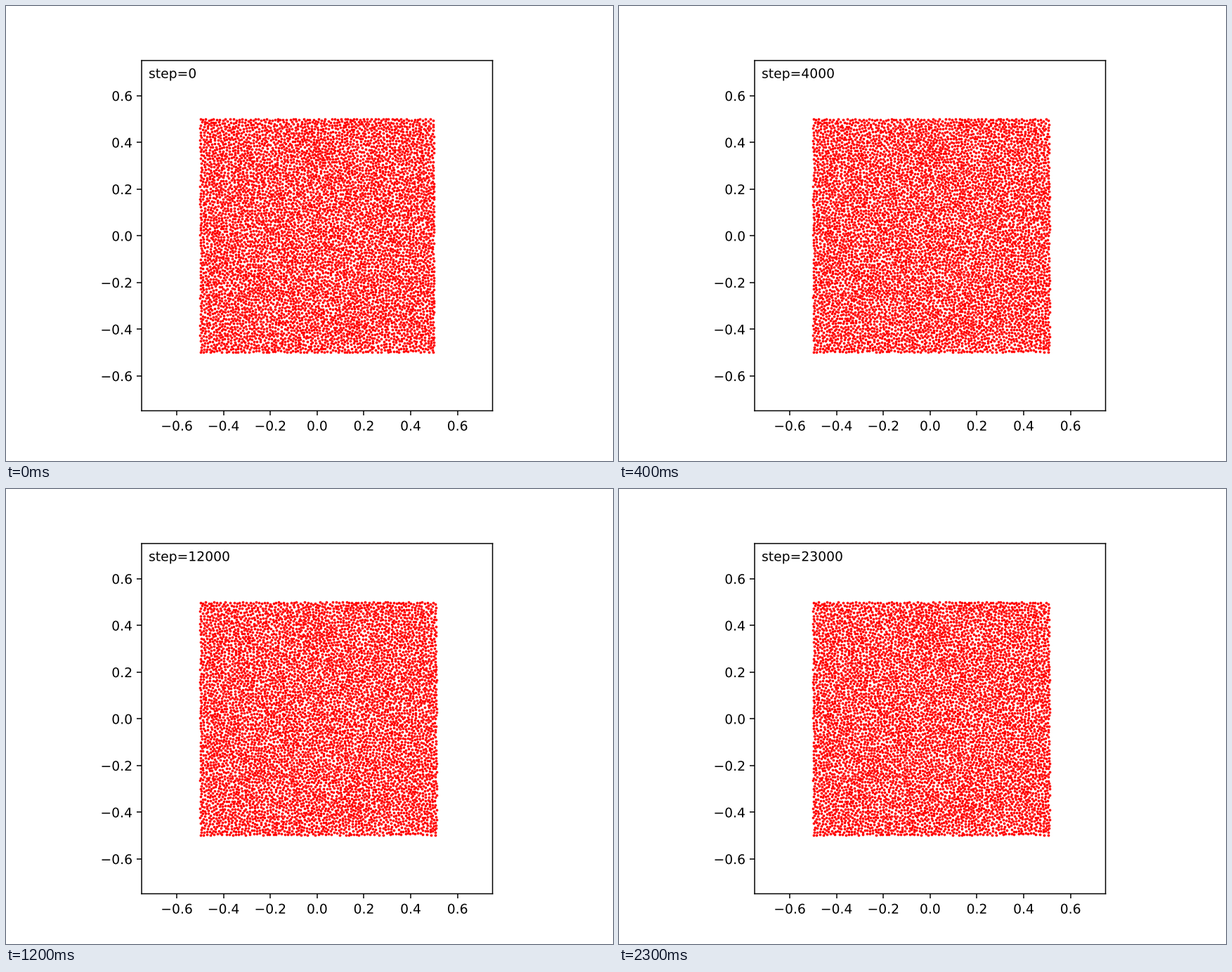
These frames come from a looping animation (864x648 px, 2400 ms). A matplotlib script:

```python
import numpy as np
import matplotlib.pyplot as plt
from matplotlib.animation import FuncAnimation
from matplotlib.patheffects import Normal

FRAMES = 24
INTERVAL = 100
STEPS_PER_FRAME = 1000
SPACING = 0.01
TRIES = 250_000
STRETCH = 0.01
POISSON = 1 / 3


def spread_points(spacing, tries, seed=0):
    """Random points in the unit square, none closer than the spacing."""
    cells = {}
    rng = np.random.RandomState(seed)
    near = [(i, j) for i in (-1, 0, 1) for j in (-1, 0, 1)]
    limit = spacing ** 2
    for x, y in rng.rand(tries, 2).tolist():
        cx, cy = int(x / spacing), int(y / spacing)
        if all((x - px) ** 2 + (y - py) ** 2 >= limit
               for i, j in near
               for px, py in cells.get((cx + i, cy + j), ())):
            cells.setdefault((cx, cy), []).append((x, y))
    return np.array([p for cell in cells.values() for p in cell])


x0, y0 = spread_points(SPACING, TRIES).T - 0.5

plt.rcParams["font.family"] = "DejaVu Sans"
fig = plt.figure(figsize=(6.4, 4.8), dpi=135)
ax = fig.add_axes([286 / 1280, 106 / 960, 740 / 1280, 739 / 960])
ax.set_xlim(-0.75, 0.75)
ax.set_ylim(-0.75, 0.75)
ticks = np.linspace(-0.6, 0.6, 7).round(1)
ax.set_xticks(ticks)
ax.set_yticks(ticks)

dots = ax.scatter(x0, y0, s=4, c="red", linewidths=0)
label = ax.text(0.02, 0.95, "", transform=ax.transAxes)

# Place lines and glyphs between whole pixels.
for spine in ax.spines.values():
    spine.set_snap(False)
for text in [label, *ax.get_xticklabels(), *ax.get_yticklabels()]:
    text.set_path_effects([Normal()])


def positions(k):
    """Plate held at the left edge, pulled at the right, relaxing to even strain."""
    if k == 0:
        return x0, y0
    power = 1 + 2 * np.exp(-k / 2)
    shift = STRETCH * (x0 + 0.5) ** power
    squeeze = POISSON * STRETCH * (1 - np.exp(-k / 5))
    return x0 + shift, y0 * (1 - squeeze)


def update(k):
    dots.set_offsets(np.column_stack(positions(k)))
    label.set_text(f"step={k * STEPS_PER_FRAME}")
    return dots, label


anim = FuncAnimation(fig, update, frames=FRAMES, interval=INTERVAL,
                     repeat=True, repeat_delay=0)
plt.show()
```
